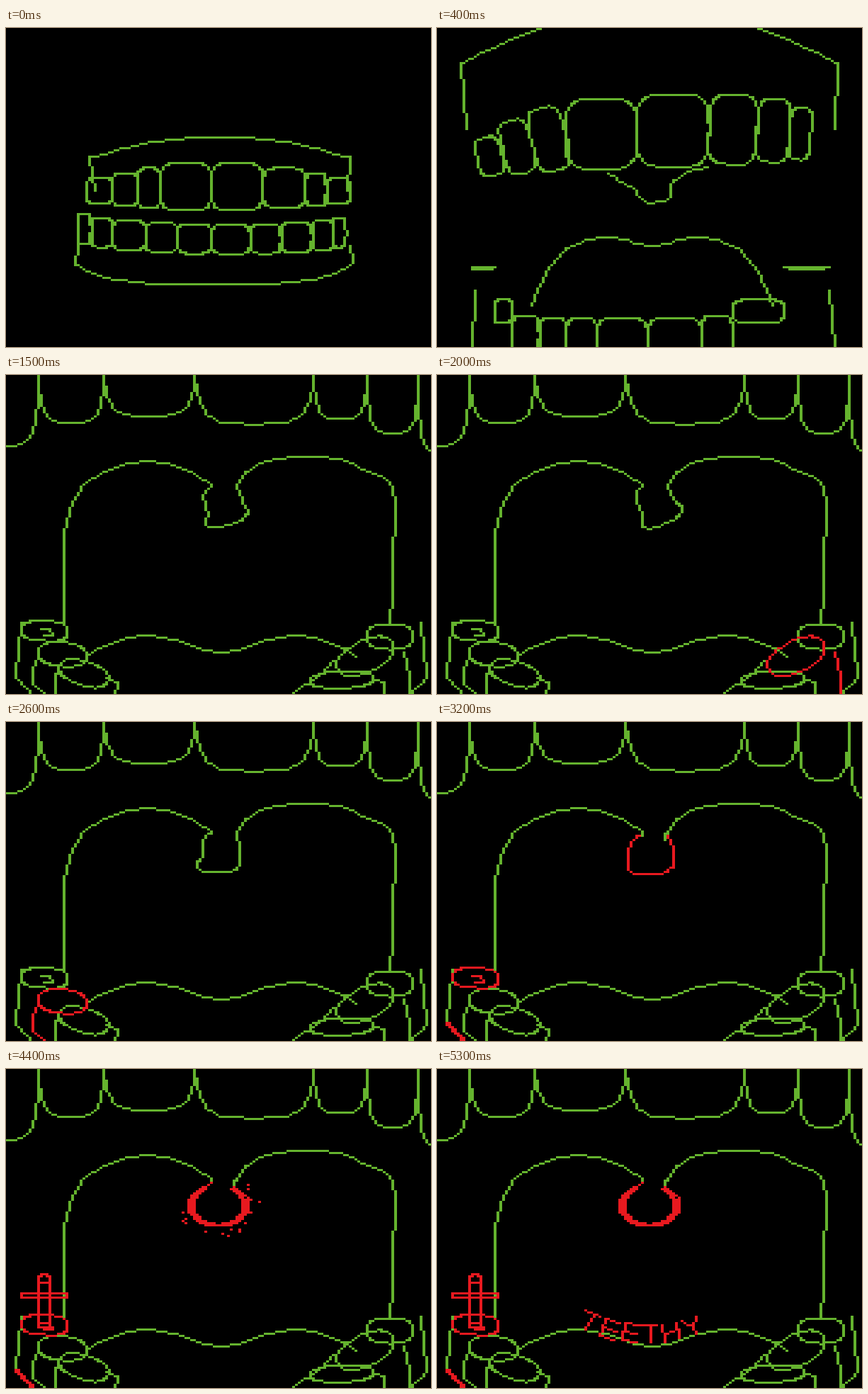
Write an HTML page with a canvas that moves like this. It is 600 by 450 pixels and loops after 5400 ms.

```html
<!DOCTYPE html>
<html lang="en">
<head>
<meta charset="utf-8">
<title>Teeth</title>
<style>
html, body { margin: 0; width: 100%; height: 100%; overflow: hidden; background: #000; }
canvas { display: block; width: 600px; height: 450px; image-rendering: pixelated; }
</style>
</head>
<body>
<canvas id="stage" width="150" height="150"></canvas>
<script>
const ctx = document.getElementById('stage').getContext('2d');
const GREEN = '#65b32e', RED = '#e8191f', STEP = 100, LOOP = 54;
const { PI, abs, sin, cos, floor, max, min, sign } = Math;

const range = (n, f) => Array.from({ length: n }, (_, i) => f(i));
const path = text => text.match(/\S+ \S+/g).map(p => p.split(' ').map(Number));
const blend = (a, b, u) => Array.isArray(a) ? a.map((v, i) => blend(v, b[i], u)) : a + (b - a) * u;
const turn = ([x, y], a) => [x * cos(a) - y * sin(a), x * sin(a) + y * cos(a)];
const move = (pts, dx, dy) => pts.map(([x, y]) => [x + dx, y + dy]);
const random = seed => { const v = sin(seed * 127.1) * 43758.5453; return v - floor(v); };

// Cells are 4 wide and 3 high on the stage
const cell = ([x, y]) => [floor(x / 4), floor(y / 3)];

function trace(pts, color = GREEN) {
  ctx.fillStyle = color;
  pts.map(cell).forEach(([x, y], i, cells) => {
    const [px, py] = cells[max(0, i - 1)];
    const n = max(abs(x - px), abs(y - py), 1);
    for (let k = 0; k <= n; k++)
      ctx.fillRect(floor(px + (x - px) * k / n + .5), floor(py + (y - py) * k / n + .5), 1, 1);
  });
}

// Catmull-Rom curve through a few points
function smooth(pts, detail = 5) {
  const last = pts.length - 1;
  return range(last * detail + 1, j => {
    const i = min(last - 1, floor(j / detail)), f = j / detail - i;
    const [a, b, c, d] = [-1, 0, 1, 2].map(k => pts[max(0, min(last, i + k))]);
    return [0, 1].map(k => b[k] + f / 2 * (c[k] - a[k] +
      f * (2 * a[k] - 5 * b[k] + 4 * c[k] - d[k] + f * (3 * (b[k] - c[k]) + d[k] - a[k]))));
  });
}

const box = (x0, y0, x1, y1) => [[x0, y0], [x1, y0], [x1, y1], [x0, y1], [x0, y0]];

// Superellipse: round 1 is an ellipse, smaller is squarer
function tooth([x, y, rx, ry, tilt, round]) {
  const bulge = v => sign(v) * abs(v) ** round;
  return move(range(65, i => {
    const a = i / 32 * PI;
    return turn([rx * bulge(cos(a)), ry * bulge(sin(a))], tilt);
  }), x, y);
}

function row(edges, top, bottom, tilt = () => 0) {
  return edges.slice(1).map((x, i) => {
    const left = edges[i], t = top(i), b = bottom(i);
    return [(left + x) / 2, (t + b) / 2, (x - left) / 2, (b - t) / 2, tilt(i), .5];
  });
}

// Arch of the jaw with two straight sides
function arch([x, half, y, rise, side, power]) {
  const curve = range(41, i => {
    const u = sin((i / 40 - .5) * PI);
    return [x + half * u, y - rise * (1 - abs(u) ** power)];
  });
  return [[x - half + 6, y + side], ...curve, [x + half - 6, y + side]];
}

function tongue([x, half, y, rise, dip, width]) {
  return range(49, i => {
    const u = i / 24 - 1;
    return [x + half * u, y - rise * (1 - abs(u) ** 5) + dip * Math.exp(-((u / width) ** 2))];
  });
}

// Each pose: gum, base, tongue, upper teeth, lower teeth
const shut = [
  [302, 184, 183, 29, 45, 2], [293, 197, 332, -30, -25, 4], [300, 80, 285, 5, 3, .2],
  row([114, 150, 186, 218, 290, 363, 423, 452, 486],
    i => 187 + 7 * abs(i - 3.5), i => 259 - 3 * abs(i - 3.5)),
  row([100, 120, 150, 197, 242, 290, 345, 388, 432, 462, 480],
    i => 277 - .6 * (i - 5) ** 2, i => 319 - .6 * (i - 5) ** 2)
];
const open = [
  [300, 266, 50, 73, 92, 2], [304, 256, 455, -60, -85, 4], [304, 170, 390, 95, 13, .2],
  row([56, 92, 134, 182, 282, 384, 452, 498, 528],
    i => 93 + 3 * (i - 4.5) ** 2, i => 209 - 3.3 * i, i => i < 3 ? -.25 : i > 4 ? .08 : 0),
  row([48, 80, 106, 144, 183, 226, 297, 374, 417, 490, 552],
    i => 408 - 11 * max(0, abs(i - 4.5) - 2) ** 2,
    i => 480 - 16 * max(0, abs(i - 4.5) - 1.5) ** 2)
];
const bottoms = [90, 100, 67, 58, 69, 62, 82, 109];
const wide = [
  [300, 360, -20, 150, 60, 2], [304, 289, 425, -100, -75, 4], [304, 190, 398, 33, 26, .33],
  row([-200, -60, 46, 138, 267, 434, 510, 582, 650], () => -150, i => bottoms[i]),
  [
    [55, 361, 32, 14, .05, .7], [80, 394, 35, 17, .1, .9], [110, 421, 36, 17, .3, .9],
    ...row([150, 225, 300, 375, 450], () => 520, () => 620),
    [474, 430, 45, 12, -.05, .9], [507, 397, 43, 22, -.45, .9], [542, 369, 33, 18, 0, .8]
  ]
];

const throat = ['82 348 82 242 100 168 150 132 200 122 245 130 290 153',
  '325 157 345 133 390 118 465 118 505 134 546 162 546 260 543 350'].map(text => smooth(path(text)));
const folds = ['46 398 37 415 37 435 55 448', '562 390 570 425 570 450', '460 402 445 420 405 448',
  '70 450 70 422 80 425', '143 428 157 433 155 450', '518 427 535 433 535 450',
  '48 358 62 358 64 366 54 366'].map(path);
const uvula = smooth(path('290 155 279 168 278 190 270 203 280 211 300 212 320 210 331 200 331 185 326 157'));
const flap = smooth(path('242 205 275 225 295 245 320 244 331 236 333 218 355 203 380 197'), 45 / 7);

const GLYPHS = {
  T: ['-1 -1 1 -1', '0 -1 0 1'],
  E: ['1 -1 -1 -1 -1 1 1 1', '-1 0 1 0'],
  H: ['-1 -1 -1 1', '1 -1 1 1', '-1 0 1 0'],
  Y: ['-1 -1 0 0 1 -1', '0 0 0 1']
};

// The uvula bends further towards its tip
function swing(n) {
  const angle = cos((n - 10.3) / 7 * 2 * PI) * .5;
  return uvula.map(([x, y]) => {
    const [dx, dy] = turn([x - 305, y - 155], angle * min(1, (y - 155) / 45));
    return [305 + dx, 155 + dy];
  });
}

const ring = inset => range(uvula.length, i => {
  const a = PI + 1.05 - i / (uvula.length - 1) * (PI + 2.1);
  return [300 + (43 - inset) * cos(a), 193 + (29 - inset / 3) * sin(a)];
});

function drawUvula(n) {
  if (n < 4) {
    if (n > 1) trace(flap.map(([x, y]) => [300 + (x - 300) * n / 4, 230 + (y - 230) * n / 4]));
  } else if (n < 6) {
    trace(n === 4 ? flap : range(uvula.length, i =>
      blend(flap[floor(i / uvula.length * flap.length)], uvula[i], .5)));
  } else if (n < 31) {
    trace(swing(n));
  } else {
    const u = min(1, (n - 30) / 6);
    trace([[290, 153], [290, 160]]);
    trace([[323, 157], [323, 165]]);
    for (let inset = 0; inset <= 8 * u; inset += 4) trace(blend(uvula, ring(inset), u), RED);
    if (u === 1) trace([[278, 168], [288, 160]], RED);
  }
}

function drawSparks(n) {
  range(16, i => {
    const angle = random(i + n * 31) * 5 - .95, reach = 1.1 + random(i * 7 + n) * .35;
    trace([[300 + 43 * reach * cos(angle), 193 + 30 * reach * sin(angle)]], RED);
  });
}

// Drops out of the upper jaw and lands on the red molar
function drawImplant(n) {
  const parts = [box(46, 300, 62, 364)];
  if (n > 40) parts.push(box(22, 316, 86, 322), tooth([54, 296, 8, 6, 0, 1]));
  const fall = min(0, (n - 43.7) * 48);
  parts.forEach(p => trace(move(p, 0, fall).map(([x, y]) => [x, max(66, y)]), RED));
}

function drawWord(count) {
  [...'TEETHY'].slice(0, count).forEach((letter, i) => {
    const glyph = GLYPHS[letter].map(path);
    glyph.forEach(pts => trace(move(pts.map(([x, y]) => turn([x * 10, y * 12], .16 * (2.8 - i))),
      215 + 29 * i, 374 - 2.2 * (i - 2.8) ** 2), RED));
  });
}

function draw(n) {
  ctx.fillStyle = '#000';
  ctx.fillRect(0, 0, 150, 150);
  const pose = n < 4 ? blend(shut, open, n / 4) : blend(open, wide, min(1, (n - 4) / 2));
  const [gum, base, tongueShape, upper, lower] = pose;
  trace(arch(gum));
  trace(arch(base));
  if (n) trace(tongue(tongueShape));
  [...upper, ...lower].forEach(t => trace(tooth(t)));
  if (n > 4) throat.forEach(p => trace(p));
  if (n > 5) folds.forEach(p => trace(p));
  drawUvula(n);

  // Teeth flash in turn around the mouth
  const tour = [...upper.slice(1, 7), ...[8, 7, 2, 1].map(i => lower[i])];
  if (n >= 8 && n < 28 && n % 2 === 0) {
    const target = tour[n / 2 - 4];
    trace(tooth(target), RED);
    if (target === lower[1]) trace(folds[0], RED);
    if (target === lower[8]) trace(folds[1], RED);
  }
  if (n >= 28) {
    const side = arch(base).filter(([x, y]) => x < 40 && y > 370);
    [tooth(lower[0]), side, move(side, 4, 0), folds[6]].forEach(p => trace(p, RED));
  }
  if (n >= 37 && n <= 44) drawSparks(n);
  if (n >= 38) drawImplant(n);
  drawWord(max(0, n - 47));
}

let shown = -1;
function tick() {
  const n = floor(performance.now() / STEP) % LOOP;
  if (n !== shown) draw(shown = n);
  requestAnimationFrame(tick);
}
tick();
</script>
</body>
</html>
```
